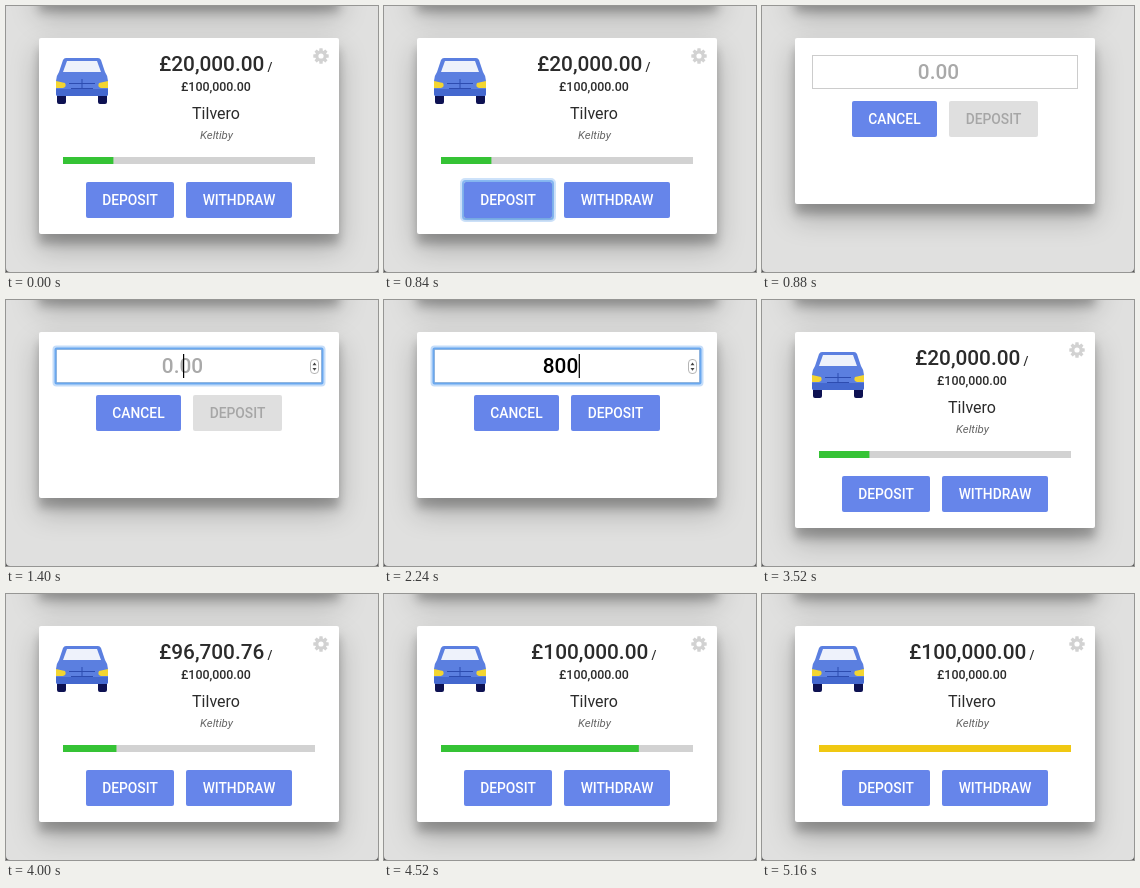
These frames come from a looping animation (372 by 266 pixels, 6.68 s). An HTML page:

```html
<!DOCTYPE html>
<html lang="en">
<head>
<meta charset="utf-8">
<title>Savings goal</title>
<style>
  html, body { margin: 0; width: 100%; height: 100%; overflow: hidden; background: #555; }
  #stage {
    position: relative; width: 372px; height: 266px; overflow: hidden;
    background: #e0e0df; border-radius: 0 0 4px 4px;
  }
  .card {
    position: absolute; left: 33px; width: 300px; border-radius: 2px; background: #fff;
    box-shadow: 0 14px 28px rgba(0,0,0,.25), 0 10px 10px rgba(0,0,0,.22);
  }
  #above { top: -104px; height: 100px; }
  #card { top: 32px; height: 196px; }
  svg { position: absolute; left: 0; top: 0; }
  text { font-family: Roboto, Arial, sans-serif; font-weight: 500; fill: #2b2b2b; text-anchor: middle; }
  .big { font-size: 20.8px; }
  .small { font-size: 12.4px; }
  .btn rect { fill: #6685ea; }
  .btn text { font-size: 13.8px; fill: #fff; }
  .ring { fill: none; stroke: #5b9fee; }
</style>
</head>
<body>
<div id="stage">
  <div class="card" id="above"></div>
  <div class="card" id="card"></div>

  <svg id="goal" width="372" height="266">
    <g id="car">
      <path fill="#0d1152" d="M51 87h9v9q0 2-2 2h-5q-2 0-2-2zM92 87h9v9q0 2-2 2h-5q-2 0-2-2z"/>
      <path fill="#5b7fe0" d="M60 52H92Q94 52 95 54L99 66Q102 70 102 75V88Q102 90 100 90H52Q50 90 50 88V75Q50 70 53 66L57 54Q58 52 60 52Z"/>
      <path fill="#eef2fb" d="M61 55H91L95 66H57Z"/>
      <path fill="#4468cf" d="M50 83H102V88Q102 90 100 90H52Q50 90 50 88Z"/>
      <path fill="#f3d531" d="M50 75L59 77Q61 81 57 82H50ZM102 75L93 77Q91 81 95 82H102Z"/>
      <path fill="none" stroke="#2d4cb0" d="M63 77.5H89M76 73V82M65 82.5H87"/>
    </g>
    <g id="gear" fill="#d2d2d2"></g>
    <text class="big" x="209.7" y="65.3"><tspan id="sum"></tspan><tspan class="small"> /</tspan></text>
    <text class="small" x="210" y="85">£100,000.00</text>
    <text x="210" y="113" style="font-size:16px;font-weight:400">Tilvero</text>
    <text x="210.5" y="132.5" style="font-size:11.4px;font-weight:400;font-style:italic;fill:#666">Keltiby</text>
    <rect x="57" y="151" width="252" height="7" fill="#d2d2d2"/>
    <rect id="bar" x="57" y="151" height="7"/>
    <g class="btn" id="open">
      <rect x="80" y="176" width="88" height="36" rx="2"/><text x="124" y="199">DEPOSIT</text>
    </g>
    <g class="btn">
      <rect x="180" y="176" width="106" height="36" rx="2"/><text x="233" y="199">WITHDRAW</text>
    </g>
    <g class="ring" id="openRing">
      <rect x="78" y="174" width="92" height="40" rx="3" stroke-width="4" opacity=".3"/>
      <rect x="79" y="175" width="90" height="38" rx="2.5" stroke-width="2" opacity=".6"/>
    </g>
  </svg>

  <svg id="form" width="372" height="266">
    <rect x="50.5" y="49.5" width="265" height="33" fill="#fff" stroke="#ccc"/>
    <g class="ring" id="fieldRing">
      <rect x="48.5" y="47.5" width="269" height="37" rx="2" stroke-width="4" opacity=".35"/>
      <rect x="49.5" y="48.5" width="267" height="35" rx="1" stroke-width="2" opacity=".85"/>
    </g>
    <text class="big" id="field" x="176.5" y="73.3"></text>
    <rect id="caret" y="54" width="1.2" height="24" fill="#000"/>
    <g id="spinner">
      <rect x="304.5" y="59.5" width="8" height="14" rx="3.5" fill="#fff" stroke="#b5b5b5"/>
      <path fill="#444" d="M306.5 65.2l2-2.8 2 2.8zM306.5 68l2 2.8 2-2.8z"/>
    </g>
    <g class="btn">
      <rect x="90" y="95" width="85" height="36" rx="2"/><text x="132.5" y="118">CANCEL</text>
    </g>
    <g class="btn" id="send">
      <rect x="187" y="95" width="89" height="36" rx="2"/><text x="231.5" y="118">DEPOSIT</text>
    </g>
    <g class="ring" id="sendRing">
      <rect x="185" y="93" width="93" height="40" rx="3" stroke-width="4" opacity=".3"/>
      <rect x="186" y="94" width="91" height="38" rx="2.5" stroke-width="2" opacity=".6"/>
    </g>
  </svg>
</div>

<script>
const LOOP = 6680;
const START = 20000, TARGET = 100000;
const KEYS = [[1880, '8'], [2000, '80'], [2240, '800'], [2440, '8000'], [2560, '80000']];
const DIGIT = 11.8;
const GREEN = [53, 195, 53], YELLOW = [240, 200, 18];
const BLUE = [102, 133, 234], GREY = [223, 223, 223];
const WHITE = [255, 255, 255], MUTED = [166, 166, 166];

const el = id => document.getElementById(id);
const clamp = v => Math.min(1, Math.max(0, v));
const span = (t, from, to) => clamp((t - from) / (to - from));
const smooth = p => (1 - Math.cos(Math.PI * p)) / 2;
const mix = (a, b, p) => `rgb(${a.map((v, i) => Math.round(v + (b[i] - v) * p))})`;
const show = (id, on) => { el(id).style.display = on ? '' : 'none'; };
const lift = (id, p) => {
  el(id).style.filter = p ? `drop-shadow(0 1.5px 1.5px rgba(0,0,0,${0.4 * p}))` : 'none';
};
const money = v => '£' + v.toLocaleString('en-GB', { minimumFractionDigits: 2, maximumFractionDigits: 2 });

// eight teeth around a ring
el('gear').innerHTML =
  '<circle cx="315" cy="50" r="4.2" fill="none" stroke="#d2d2d2" stroke-width="3.2"/>' +
  Array.from({ length: 8 }, (_, i) =>
    `<rect x="313.3" y="42.3" width="3.4" height="3.4" rx=".5" transform="rotate(${i * 45} 315 50)"/>`).join('');

function drawGoal(t) {
  const sum = START + (TARGET - START) * smooth(span(t, 3540, 4070));
  const fill = t < 880 ? 0 : smooth(span(t, 3930, 4835));
  el('sum').textContent = money(sum);
  el('bar').setAttribute('width', 252 * (0.2 + 0.8 * fill));
  el('bar').setAttribute('fill', mix(GREEN, YELLOW, span(t, 4850, 5120)));
  lift('open', t < 880 ? span(t, 360, 480) : 0);
  show('openRing', t >= 760 && t < 880);
}

function drawForm(t) {
  const typed = KEYS.filter(k => t >= k[0]).map(k => k[1]).pop() || '';
  const focused = t >= 1400 && t < 3440;
  const field = el('field');
  field.textContent = typed || '0.00';
  field.style.fill = typed ? '#000' : '#a9a9a9';
  show('fieldRing', focused);
  show('spinner', focused);
  show('caret', focused && t < 3040);
  el('caret').setAttribute('x', 177 + typed.length * DIGIT / 2);

  const ready = span(t, 1860, 2000);
  const [box, label] = el('send').children;
  box.style.fill = mix(GREY, BLUE, ready);
  label.style.fill = mix(MUTED, WHITE, ready);
  lift('send', span(t, 2960, 3120));
  show('sendRing', t >= 3440);
}

function render(t) {
  const editing = t >= 880 && t < 3480;
  show('goal', !editing);
  show('form', editing);
  el('card').style.height = (editing ? 166 : 196) + 'px';
  if (editing) drawForm(t); else drawGoal(t);
}

const begin = performance.now();
function tick() {
  render((performance.now() - begin) % LOOP);
  requestAnimationFrame(tick);
}
tick();
</script>
</body>
</html>
```
